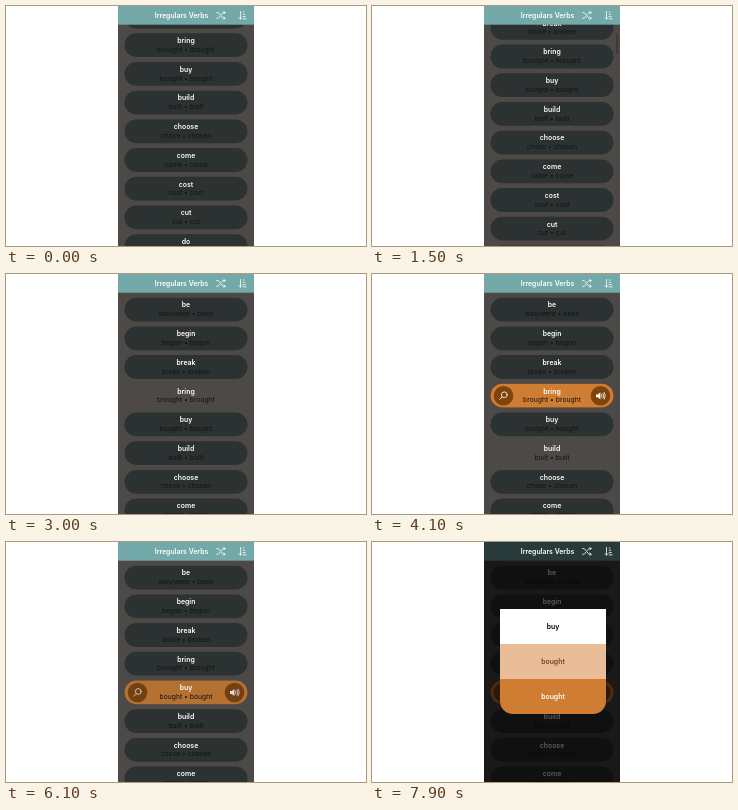
An HTML page that plays this animation: 360 px wide and 240 px high, repeating every 8000 ms.

```html
<!DOCTYPE html>
<html lang="en">
<head>
<meta charset="utf-8">
<title>Irregulars Verbs</title>
<style>
  html, body { margin: 0; width: 100%; height: 100%; overflow: hidden; background: #fff; }
  svg { display: block; width: 360px; height: 240px; }
  text { font: 600 6.9px Inter, "Liberation Sans", sans-serif; text-anchor: middle; fill: #fff; }
  text.past { font-weight: 400; font-size: 6.8px; fill: #101415; }
  .line { fill: none; stroke: #fff; stroke-linecap: round; stroke-linejoin: round; }
</style>
</head>
<body>
<svg viewBox="0 0 360 240">
  <defs>
    <clipPath id="screen"><rect x="112" width="136" height="240"/></clipPath>
    <g id="buttons">
      <circle cx="131.5" cy="12" r="9.8" fill="#7f440c"/>
      <g class="line" stroke-width=".8">
        <circle cx="132.3" cy="11" r="2.9"/>
        <path d="M130.1 13.2l-2.4 2.4"/>
      </g>
      <circle cx="228.5" cy="12" r="9.8" fill="#7f440c"/>
      <path d="M224 10.6h1.8l2.6-2.2v7.2l-2.6-2.2H224z" fill="#fff"/>
      <path class="line" stroke-width=".8" d="M229.6 10.6q.9 1.4 0 2.8M231 9.6q1.6 2.4 0 4.8M232.3 8.7q2.2 3.3 0 6.6"/>
    </g>
  </defs>
  <g clip-path="url(#screen)">
    <rect x="112" width="136" height="240" fill="#4c4946"/>
    <g id="list"></g>
    <rect id="bar" x="244.5" width="1.5" height="21.5" rx=".75" fill="#383532"/>
    <rect x="112" width="136" height="18.7" fill="#73a9a8"/>
    <rect id="dim" x="112" width="136" height="240"/>
    <text x="175.5" y="12">Irregulars Verbs</text>
    <g class="line" stroke-width=".8">
      <path d="M210.6 6.6h1.7l4.5 5.6h2.2M210.6 12.2h1.7l1.4-1.8M215.4 8.4l1.4-1.8h2.2M217.8 5.2l1.4 1.4-1.4 1.4M217.8 10.8l1.4 1.4-1.4 1.4"/>
      <path d="M234.5 5.5v7.6M233 11.6l1.5 1.5 1.5-1.5M237.2 6h.8M237.2 8.3h1.5M237.2 10.6h2.2M237.2 12.9h3"/>
    </g>
    <g id="card">
      <path d="M-53-52.5h106v35h-106z" fill="#fff"/>
      <path d="M-53-17.5h106v35h-106z" fill="#e8bd98"/>
      <path d="M-53 17.5h106v22a13 13 0 0 1-13 13h-80a13 13 0 0 1-13-13z" fill="#cf7d32"/>
      <text y="-32.5" style="fill:#000">buy</text>
      <text y="2.5" style="fill:#774820">bought</text>
      <text y="37.5">bought</text>
    </g>
  </g>
</svg>
<script>
const LOOP = 8000, STEP = 28.7, TOP = 23.7;
const PRESS = 200, GLOW = 240;
const verbs = `be was/were been|begin began begun|break broke broken|bring brought brought
buy bought bought|build built built|choose chose chosen|come came come|cost cost cost
cut cut cut|do did done|draw drew drawn`.split(/[|\n]/).map(v => v.split(" "));

// Each tap takes the highlight from the row tapped before it.
const taps = { bring: 2850, build: 4000, buy: 5700 };

const ramp = (t, from, length) => Math.min(1, Math.max(0, (t - from) / length));
const smooth = p => p * p * (3 - 2 * p);

const $ = id => document.getElementById(id);
const list = $("list"), bar = $("bar"), dim = $("dim"), card = $("card");
const pill = fill => `<rect x="118.5" width="123" height="23.8" rx="11.9" fill="${fill}"/>`;

list.innerHTML = verbs.map(([base, past, part], i) => `
  <g transform="translate(0 ${TOP + i * STEP})">
    <g class="dark">${pill("#2c3231")}</g>
    <g class="lit">${pill("#cf7d32")}<use href="#buttons"/></g>
    <text x="180" y="9.8">${base}</text>
    <text class="past" x="180" y="18.6">${past} • ${part}</text>
  </g>`).join("");

const rows = verbs.map(([name], i) => {
  const tap = taps[name] ?? Infinity;
  const next = Math.min(...Object.values(taps).filter(time => time > tap));
  const [dark, lit] = list.children[i].children;
  return { tap, next, dark, lit };
});

// A slow drag, a fling past the top, then the bounce back.
function scrollAt(t) {
  return 82.5 - 11.3 * ramp(t, 600, 900) - 73.2 * smooth(ramp(t, 1500, 600)) + 2 * ramp(t, 2200, 300);
}

function draw(t) {
  const y = scrollAt(t);
  list.setAttribute("transform", `translate(0 ${-y})`);
  bar.setAttribute("y", 20 + Math.max(0, y) * .1);
  bar.setAttribute("opacity", ramp(t, 500, 150) - ramp(t, 2400, 300));

  for (const { tap, next, dark, lit } of rows) {
    const glow = ramp(t, tap + PRESS, GLOW);
    dark.setAttribute("opacity", 1 - ramp(t, tap, 80) + glow);
    lit.setAttribute("opacity", glow - ramp(t, next + PRESS, 150));
  }

  dim.setAttribute("opacity", .65 * ramp(t, 7200, 250));
  const left = 1 - ramp(t, 7200, 600);
  card.setAttribute("transform",
    `translate(${181 - 21.6 * left} ${119.5 - 188 * left ** 2}) rotate(${12 * left})`);
}

const start = performance.now();
function tick() {
  draw((performance.now() - start) % LOOP);
  requestAnimationFrame(tick);
}
tick();
</script>
</body>
</html>
```
